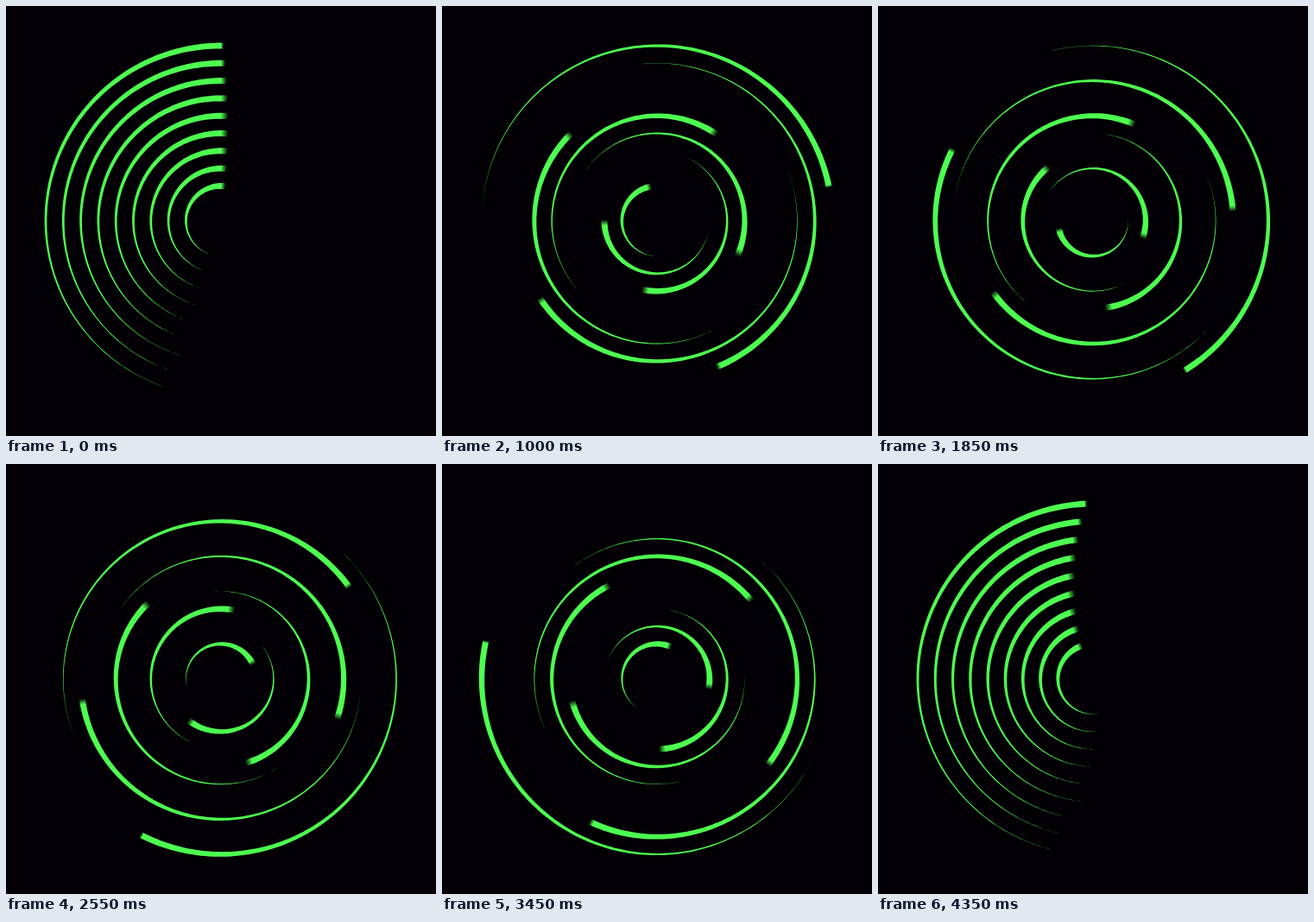
An HTML page with a canvas that plays this animation: 498 by 498 pixels, repeating every 4.4 s.

```html
<!DOCTYPE html>
<html lang="en">
<head>
<meta charset="utf-8">
<title>Spinning rings</title>
<style>
  html, body { margin: 0; width: 100%; height: 100%; overflow: hidden; background: #020004; }
  canvas { display: block; }
</style>
</head>
<body>
<canvas id="stage" width="498" height="498"></canvas>
<script>
const ctx = document.getElementById('stage').getContext('2d');
const CENTER = 249, RINGS = 9, GAP = 20.3;
const STEP = 50, STEPS = 88, POSES = 129;
const TRAIL = 165, BLUR = 0.8, HEAD_WIDTH = 7;
const rad = deg => deg * Math.PI / 180;

// Stroke width at a distance in degrees behind the head
const widthAt = behind =>
  HEAD_WIDTH * Math.min(1, Math.max(0, 1 - behind / TRAIL)) ** 1.2;

// Poses advance one by one at first, then three for every two steps
const poseAt = step => Math.max(step, Math.floor(step * 1.5) - 2);

function drawRing(radius, head, blur) {
  const tail = head - TRAIL, span = TRAIL + blur, parts = 120;
  const point = (i, side) => {
    const deg = tail + span * i / parts;
    const r = radius + side * widthAt(head - deg) / 2;
    ctx.lineTo(CENTER + r * Math.cos(rad(deg)), CENTER + r * Math.sin(rad(deg)));
  };
  const paint = ctx.createConicGradient(rad(tail), CENTER, CENTER);
  paint.addColorStop(0, '#4dff50');
  paint.addColorStop(TRAIL / 360, '#4dff50');
  paint.addColorStop(span / 360, '#4dff5000');
  ctx.fillStyle = paint;
  ctx.beginPath();
  for (let i = 0; i <= parts; i++) point(i, 1);
  for (let i = parts; i >= 0; i--) point(i, -1);
  ctx.fill();
}

function draw(now) {
  const step = Math.floor(now / STEP) % STEPS;
  const turn = 360 * poseAt(step) / POSES;
  ctx.fillStyle = '#020004';
  ctx.fillRect(0, 0, 498, 498);
  // The outermost ring turns once per loop, each inner one once more
  for (let turns = 1; turns <= RINGS; turns++) {
    drawRing(GAP * (RINGS + 2 - turns), (turn * turns) % 360 - 90, BLUR * turns);
  }
  requestAnimationFrame(draw);
}
draw(0);
</script>
</body>
</html>
```
